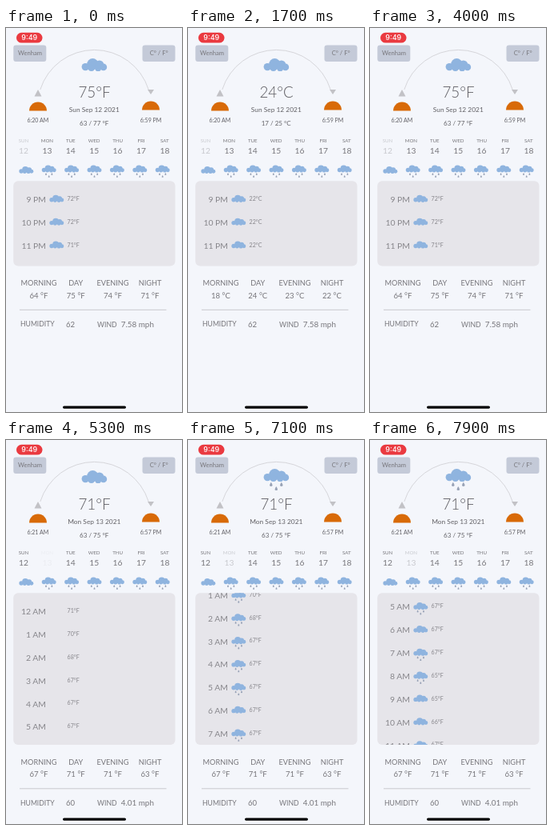
An HTML page that plays this animation: 220 px wide and 480 px high, repeating every 8000 ms.

```html
<!DOCTYPE html>
<html lang="en">
<head>
<meta charset="utf-8">
<title>Weather</title>
<style>
  html, body { margin: 0; width: 100%; height: 100%; overflow: hidden; background: #f4f6fb; }
  svg { display: block; width: 220px; height: 480px; font-family: Lato, sans-serif; fill: #77767b; }
  .strong { fill: #626166; }
  .thin { fill: #5c5b60; font-weight: 300; }
  .faint { fill: #87868b; }
</style>
</head>
<body>
<svg id="stage" viewBox="0 0 220 480"></svg>
<script>
const LOOP = 8000, ROW = 28.85;
const stage = document.getElementById('stage');
const dayNames = ['SUN', 'MON', 'TUE', 'WED', 'THU', 'FRI', 'SAT'];
const parts = [['MORNING', 41], ['DAY', 87.3], ['EVENING', 133.5], ['NIGHT', 180]];
// Cloud puffs as [x, y, radius].
const puffs = [[3.2, 6.7, 2.9], [8.8, 4.6, 4.4], [14, 5.1, 3.4], [17.1, 6.9, 2.7], [7.8, 7.6, 2.5], [13, 7.7, 2.4]];

const sunday = {
  date: 'Sun Sep 12 2021', rise: '6:20 AM', set: '6:59 PM', humidity: 62, wind: '7.58',
  first: 9, half: 'PM', dry: [0, 1, 2], panel: 106
};
const sundayF = { ...sunday, unit: '°F', now: 75, range: '63 / 77', parts: [64, 75, 74, 71], hours: [72, 72, 71] };
const sundayC = { ...sunday, unit: '°C', now: 24, range: '17 / 25', parts: [18, 24, 23, 22], hours: [22, 22, 22] };
const mondayF = {
  date: 'Mon Sep 13 2021', rise: '6:21 AM', set: '6:57 PM', humidity: 60, wind: '4.01',
  first: 0, half: 'AM', dry: [6, 9, 10], panel: 189.5,
  unit: '°F', now: 71, range: '63 / 75', parts: [67, 71, 71, 63],
  hours: [71, 70, 68, 67, 67, 67, 67, 67, 65, 65, 66, 67]
};

const ramp = (t, from, to) => Math.min(1, Math.max(0, (t - from) / (to - from)));
const smooth = x => x * x * (3 - 2 * x);
const easeOut = x => x * (2 - x);
// Opacity of a touched control: quick dim, slower recovery.
const touch = (t, down, up) => 1 - 0.8 * smooth(ramp(t, down, down + 100)) * (1 - smooth(ramp(t, up, up + 200)));

// Text placed by the middle of its capitals.
const text = (str, x, y, size, anchor = 'middle', extra = '') =>
  `<text x="${x}" y="${y + size * 0.36}" font-size="${size}" text-anchor="${anchor}" ${extra}>${str}</text>`;

const drop = (x, y) => `<path d="M${x} ${y - 1.7}q2.2 3.2 0 3.2t0-3.2" fill="#98a2b6"/>`;

function cloud(x, y, scale, rain) {
  const shape = puffs.map(([cx, cy, r]) => `<circle cx="${cx}" cy="${cy}" r="${r}"/>`).join('');
  return `<g transform="translate(${x} ${y}) scale(${scale}) translate(-10 -5.1)" fill="#8fb4df">
    ${shape}${rain ? drop(6, 12.2) + drop(14, 12.2) + drop(10, 15.4) : ''}</g>`;
}

const button = (x, label, size, opacity = 1) =>
  `<g opacity="${opacity}"><rect x="${x}" y="21.5" width="41" height="20.5" rx="3" fill="#c4cad8"/>
   ${text(label, x + 20.7, 31.7, size)}</g>`;

const sun = (x, y) => `<path d="M${x - 11} ${y}a11 11 0 0 1 22 0z" fill="#d86a08"/>`;

function header(d, rain, pressed) {
  return `<rect x="13" y="5.8" width="32.5" height="12.8" rx="6.4" fill="#ea3a40"/>
    ${text('9:49', 29.3, 12.2, 9, 'middle', 'style="fill:#fff;font-family:Inter,sans-serif;font-weight:500"')}
    <path d="M42.8 77A71 71 0 0 1 178.2 77" fill="none" stroke="#d2d2d6" stroke-width=".9"/>
    ${button(9.3, 'Wenham', 7.6)}${button(170.5, 'C° / F°', 7.6, pressed)}
    <path d="M40 77l4.5 8.5h-9zM177 77h8l-4 6z" fill="#c2c2c6"/>
    ${sun(40, 103.5)}${sun(181, 102.5)}
    ${text(d.rise, 39.8, 115.3, 7, 'middle', 'class="strong"')}
    ${text(d.set, 181, 115.3, 7, 'middle', 'class="strong"')}
    ${cloud(110.3, rain ? 44 : 46, 1.62, rain)}
    ${text(d.now + d.unit, 110.5, 80, 18.8, 'middle', 'class="thin"')}
    ${text(d.date, 110.3, 101.7, 8.4, 'middle', 'class="strong"')}
    ${text(d.range + ' ' + d.unit, 110.2, 119.2, 8, 'middle', 'class="strong"')}`;
}

const week = (selected, pressed) => dayNames.map((name, i) => {
  const x = 22 + 29.4 * i;
  const opacity = (i === selected ? 0.35 : 1) * (i === 1 ? pressed : 1);
  return `<g opacity="${opacity}">${text(name, x, 140.6, 6.2)}${text(12 + i, x, 153.3, 10.3)}</g>
    ${cloud(25.3 + 28.4 * i, i ? 176 : 177.5, 0.92, i)}`;
}).join('');

function panel(d, icons, scroll) {
  const rows = d.hours.map((temp, i) => {
    const y = 214.5 + i * ROW - scroll;
    return text(`${d.first + i || 12} ${d.half}`, 50, y, 10.4, 'end', 'class="faint"')
      + (icons ? cloud(63.3, y - 1.2, 0.92, !d.dry.includes(i)) : '')
      + text(temp + d.unit, 76.6, y - 1, 7.1, 'start', 'class="faint"');
  });
  const box = `<rect x="9.2" y="191.3" width="202.3" height="${d.panel + 0.3}" rx="6"`;
  return `<clipPath id="list">${box}/></clipPath>${box} fill="#e6e5ea"/>
    <g clip-path="url(#list)">${rows.join('')}</g>`;
}

function footer(d) {
  const cells = parts.map(([name, x], i) => text(name, x, 319, 9.2) + text(`${d.parts[i]} ${d.unit}`, x, 334.3, 9.6));
  return `<g transform="translate(0 ${d.panel - 106})">${cells.join('')}
    <path d="M17 352.3h183.5" stroke="#c9c9ce"/>
    ${text('HUMIDITY', 18, 370.4, 8.6, 'start')}${text(d.humidity, 75, 370.4, 9.6, 'start')}
    ${text('WIND', 114, 370.4, 8.7, 'start')}${text(d.wind + ' mph', 143.7, 370.4, 9.9, 'start')}</g>
    <rect x="71" y="472.5" width="79" height="3.2" rx="1.6" fill="#000"/>`;
}

function draw(now) {
  const t = now % LOOP;
  const monday = t >= 5250;
  const loaded = t >= 5450;
  const data = monday ? mondayF : t >= 500 && t < 3450 ? sundayC : sundayF;
  const unitTouch = t < 2000 ? touch(t, 350, 500) : touch(t, 3320, 3420);
  const scroll = 79 * easeOut(ramp(t, 6850, 7500)) + 71 * smooth(ramp(t, 7600, 7900));
  stage.innerHTML = header(data, loaded, unitTouch)
    + week(monday ? 1 : 0, touch(t, 5120, 5300))
    + panel(data, !monday || loaded, scroll)
    + footer(data);
  requestAnimationFrame(draw);
}
requestAnimationFrame(draw);
</script>
</body>
</html>
```
